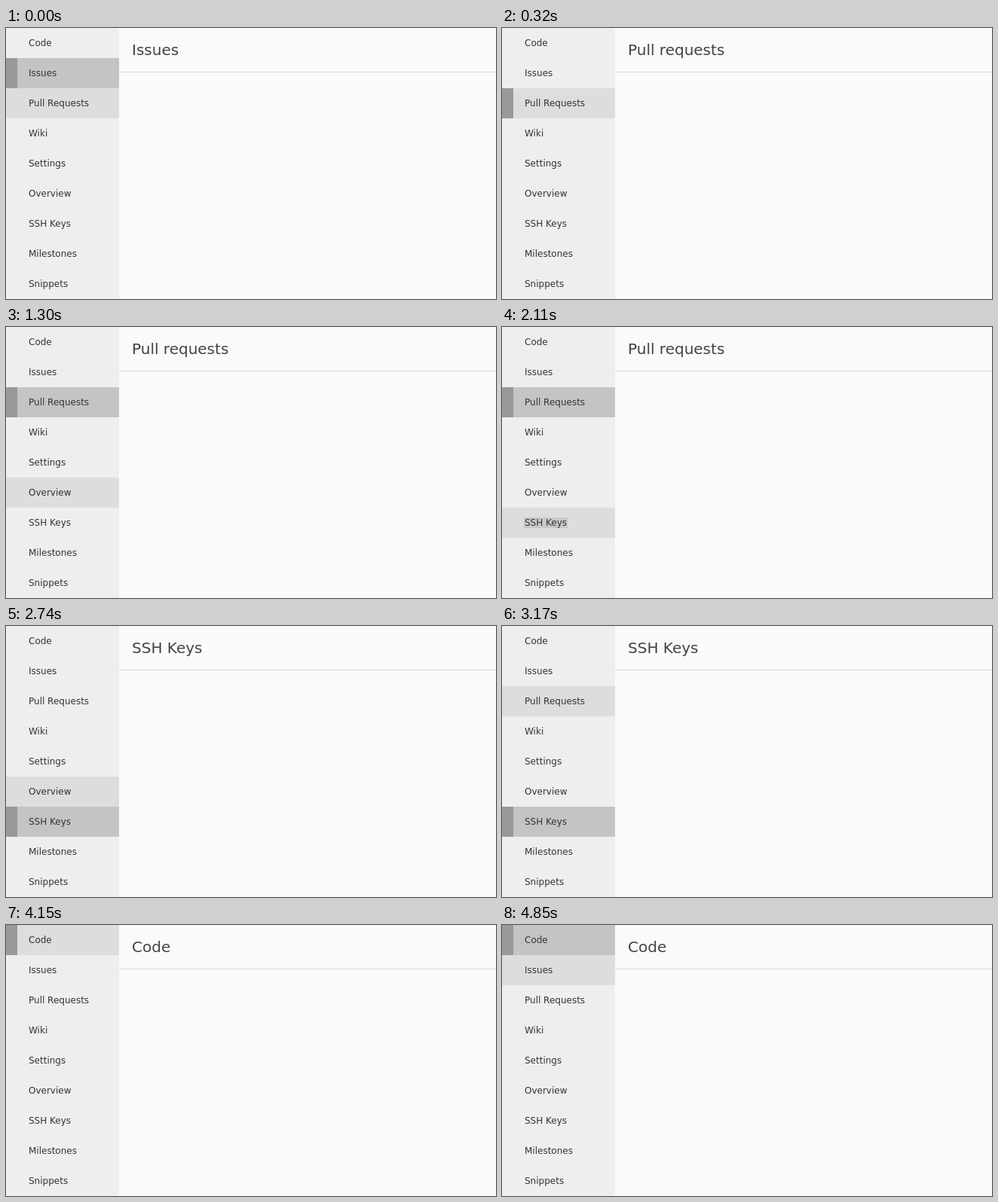
Animation of 650x360 px, one loop 4870 ms. Source, as an HTML page:

```html
<!DOCTYPE html>
<html lang="en">
<head>
<meta charset="utf-8">
<title>Sidebar menu</title>
<style>
html, body { margin: 0; width: 100%; height: 100%; overflow: hidden; background: #fafafa; }
body { position: relative; font-family: "DejaVu Sans", sans-serif; }
nav { position: absolute; left: 0; top: 0; width: 150px; height: 360px; background: #eee; }
.row { position: relative; height: 40px; padding-left: 30px; font-size: 12px; line-height: 40px; color: #333; white-space: nowrap; }
.row i { position: absolute; left: 0; top: 0; width: 15px; height: 40px; background: #999; }
.row span { padding: 0 1px; margin: 0 -1px; }
h1 { position: absolute; left: 150px; top: 0; width: 483px; height: 58px; margin: 0; padding-left: 17px; border-bottom: 1px solid #d8d8d8; font-size: 20px; font-weight: 400; line-height: 58px; color: #444; }
</style>
</head>
<body>
<nav></nav>
<h1></h1>
<script>
const LOOP = 4870;
const names = ['Code', 'Issues', 'Pull Requests', 'Wiki', 'Settings', 'Overview', 'SSH Keys', 'Milestones', 'Snippets'];
const [BASE, HOVER, ACTIVE] = [238, 221, 196];

// Each entry: start time, row, then optionally end time and number of steps
const hovers = [
  [0, 2], [760, 3, 960, 6], [1130, 4], [1260, -1], [1300, 5], [1480, 6],
  [2740, 5], [2910, 4], [3040, 3], [3170, 2], [3300, 1], [3520, 0], [4850, 1]
];
const clicks = [[0, 1], [160, 2, 320, 3], [2150, 6, 2300, 3], [3990, 0, 4150, 3]];

const nav = document.querySelector('nav');
const title = document.querySelector('h1');
const rows = names.map(name => {
  const row = document.createElement('div');
  row.className = 'row';
  row.innerHTML = `<i></i><span>${name}</span>`;
  nav.append(row);
  return { row, bar: row.firstChild, label: row.lastChild };
});

const mix = (a, b, k) => a + (b - a) * k;

function progress(t, start, end, steps) {
  if (!end || t >= end) return 1;
  return (Math.floor((t - start) / (end - start) * (steps - 1) + 1e-6) + 1) / steps;
}

// Share of a state that each row holds at time t
function weights(events, t) {
  let w = names.map(() => 0);
  for (const [start, row, end, steps] of events) {
    if (t < start) break;
    const k = progress(t, start, end, steps);
    w = w.map((v, i) => mix(v, i === row ? 1 : 0, k));
  }
  return w;
}

function render(t) {
  const hover = weights(hovers, t);
  const active = weights(clicks, t);
  rows.forEach(({ row, bar, label }, i) => {
    const c = Math.round(mix(mix(BASE, ACTIVE, active[i]), HOVER, hover[i]));
    row.style.background = `rgb(${c},${c},${c})`;
    bar.style.opacity = active[i];
    label.style.background = i === 6 && t >= 2110 && t < 2150 ? '#c8c8c8' : '';
  });
  const current = clicks.filter(([start]) => t >= start).pop()[1];
  title.textContent = current === 2 ? 'Pull requests' : names[current];
}

const begin = performance.now();
function frame() {
  render((performance.now() - begin) % LOOP);
  requestAnimationFrame(frame);
}
frame();
</script>
</body>
</html>
```
